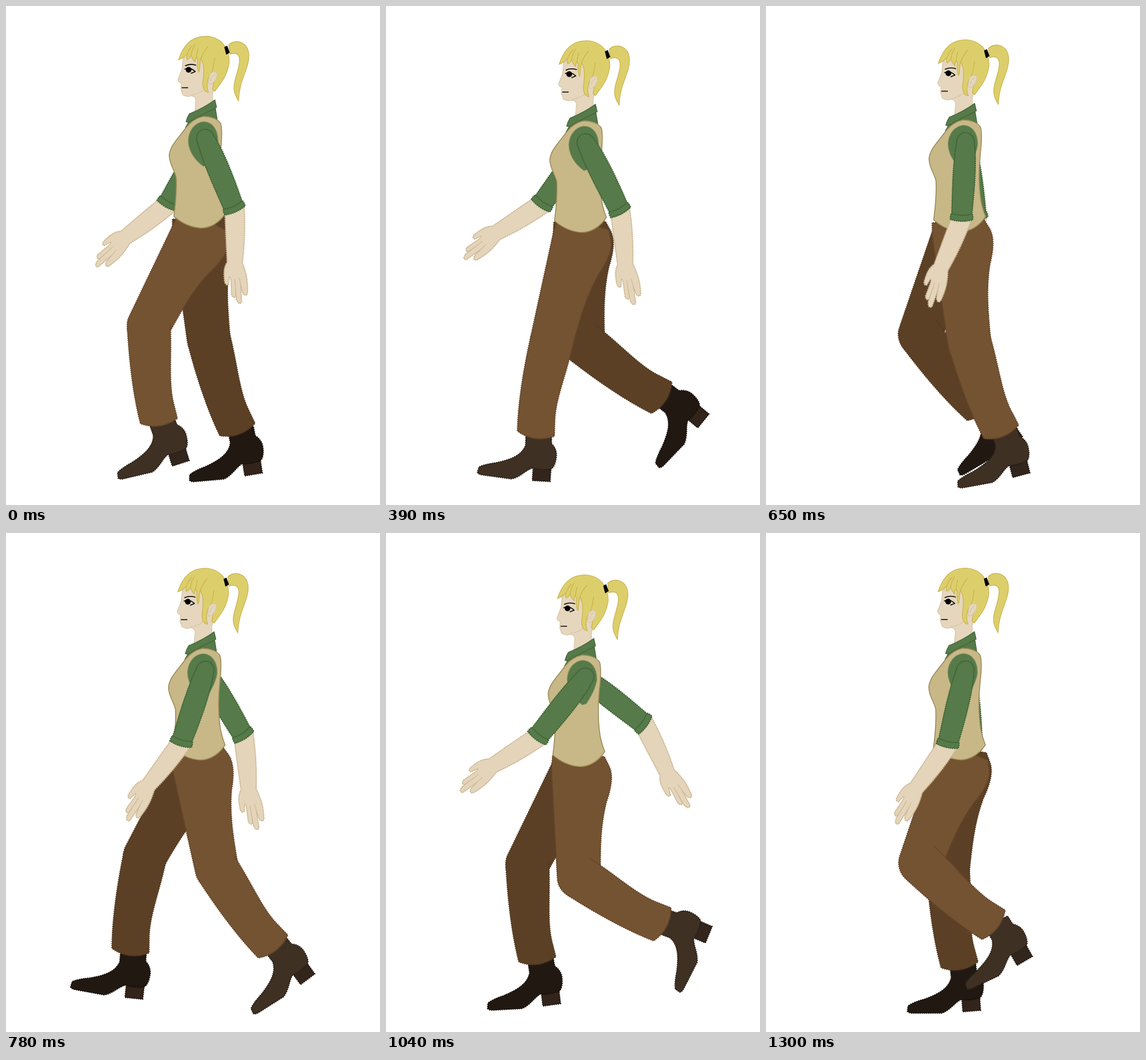
Write an HTML page that moves like this. It is 648 px wide and 864 px high and loops after 1.43 s.

```html
<!DOCTYPE html>
<html lang="en">
<head>
<meta charset="utf-8">
<title>Walk cycle</title>
<style>
  html, body { margin: 0; width: 100%; height: 100%; overflow: hidden; background: #fff; }
  svg { display: block; width: 100vw; height: 100vh; }
  path { stroke-linejoin: round; stroke-linecap: round; stroke-width: 1.2; }
  .line { fill: none; }
  .skin { fill: #e4d4ba; stroke: #cdb996; }
  .face { fill: #e5d6bd; stroke: #d5c6a8; }
  .hair { fill: #dccf6b; stroke: #cbb14c; }
  .sleeve { fill: #567a49; stroke: #3f6436; }
  .vest { fill: #c8b888; stroke: #9c8c58; stroke-width: 1.6; }
  .armhole { stroke: #7d8a58; }
  .ink { fill: #000; stroke: #000; }
  .pen { fill: none; stroke: #000; stroke-width: 1.6; }
  .near .cloth { fill: #745332; stroke: #65462a; }
  .near .boot { fill: #3e3023; stroke: #2c2118; }
  .near .heel { fill: #32251c; stroke: #241a13; }
  .far .cloth { fill: #5b4026; stroke: #523a21; }
  .far .boot { fill: #221812; stroke: #17100c; }
  .far .heel { fill: #33241b; stroke: #20160f; }
  g .fray.fray { fill: none; stroke-width: 3; stroke-dasharray: 1.5 2.2; stroke-linecap: butt; }
</style>
</head>
<body>
<svg viewBox="0 0 648 864" preserveAspectRatio="none">
  <g id="farArm" class="far"></g>
  <g id="farLeg" class="far"></g>
  <g id="nearLeg" class="near"></g>
  <g id="body">
    <!-- neck and face -->
    <path class="face" d="M306 94L304 113L297 131Q298 136 303 137L302 147L305 157Q312 162 320 159Q327 160 328 166L326 192L345 190L357 172V156L372 105L340 75Z"/>
    <path class="face line" d="M320 158Q338 155 349 142"/>
    <!-- ponytail and hair -->
    <path class="hair" d="M385 71C395 60 418 64 420 88C421 112 403 130 402 168C395 156 391 148 397 128C404 105 406 94 401 88C396 84 390 86 387 87Z"/>
    <path class="hair" d="M298 97C304 78 316 56 345 56C372 57 386 76 386 100C383 125 370 138 361 151L357 148Q358 136 364 122Q355 114 350 128C346 140 347 146 350 153Q340 152 340 136Q343 118 341 104L337 94C334 102 336 112 333 118Q330 108 331 97L329 92Q326 97 327 101Q321 95 320 89Q317 95 313 96Q311 91 313 87Q306 94 298 97Z"/>
    <path class="hair line" d="M313 87Q316 78 322 72M320 89Q321 79 327 70M329 92Q330 84 332 77M337 94Q341 83 349 74M351 125C360 115 358 103 361 94"/>
    <path class="face" d="M352 122Q359 114 365 120Q364 134 354 139Q350 139 350 133Z"/>
    <path class="face line" d="M354 133Q354 125 361 122"/>
    <path class="ink" d="M378 75L382 73L386 84L381 87Z"/>
    <!-- features -->
    <path class="pen" d="M310 107Q318 103 328 106M309 113Q317 108 327 117L320 120M304 145H314"/>
    <circle cx="315.5" cy="114" r="5"/>
    <!-- shirt and vest -->
    <path class="sleeve" d="M310 214L317 202L350 186L362 181L365 200L340 204Z"/>
    <path class="sleeve" d="M311 204Q313 196 317 190Q342 180 361 166L364 179Q338 192 315 205Z"/>
    <path class="vest" d="M340 195C352 194 366 199 371 207C374 216 373 230 372 243C368 275 368 310 372 335Q375 350 380 362C368 380 352 388 337 388C319 387 303 379 290 368C293 345 295 318 294 300C290 285 282 277 282 262C283 245 300 230 311 214C320 203 330 197 340 195Z"/>
    <path class="sleeve armhole" d="M341 204C358 204 367 220 366 239C363 256 354 270 348 279L341 281C322 267 315 250 315 236C316 219 326 206 341 204Z"/>
  </g>
  <g id="nearArm" class="near"></g>
</svg>
<script>
const STEP = 130, STEPS = 11;
const HIP = [334, 395], SHOULDER = [345, 234];
const THIGH = 184, SHIN = 173, UPPER_ARM = 130;

// A smooth loop through a few [step, value] keys, given in order of step.
function curve(...keys) {
  return step => {
    let k = keys.findLastIndex(([at]) => at <= step);
    if (k < 0) { k = keys.length - 1; step += STEPS; }
    const [t0, v0] = keys[k];
    const [t1, v1] = keys[(k + 1) % keys.length];
    const span = (t1 - t0 + STEPS) % STEPS;
    return v0 + (v1 - v0) * (1 - Math.cos(Math.PI * (step - t0) / span)) / 2;
  };
}

// Angles in degrees; positive swings forward.
const motion = {
  sway: curve([2.5, 2], [7.5, -1]),
  bob: curve([1, -7], [3, 4], [4, 0], [6, 5], [7, -7], [8, 16.5]),
  nearLeg: {
    thigh: curve([0.7, 30], [6.2, -10]),
    shin: curve([1.1, 21], [9.2, -65]),
    foot: curve([0, -12], [1, 36], [4, 0], [8, -62])
  },
  farLeg: {
    thigh: curve([1.3, -11], [6.9, 33]),
    shin: curve([1, -28], [4, -64], [7, 33], [8, -6], [10, -7]),
    foot: curve([4, -50], [7, 32], [8, -2], [10, 1])
  },
  nearArm: {
    upper: curve([1, -39], [8.7, 40]),
    fore: curve([1, -17], [8.8, 60])
  },
  farArm: {
    upper: curve([1.3, 52], [8, -52]),
    fore: curve([1.3, 73], [8, -25])
  }
};

const $ = id => document.getElementById(id);
const part = (name, d) =>
  `<path class="${name} fray" d="${d}"/><path class="${name}" d="${d}"/>`;

const thigh = part('cloth', 'M-44 -26L-46 0L-37 184A37 37 0 0 0 37 184C37 130 38 95 48 55C57 30 61 8 53 -8L45 -24Z');
const shin = part('cloth', 'M37 0C35 50 23 100 28 137L32 165Q0 183 -32 167C-39 120 -40 60 -37 0');
const shoe =
  part('heel', 'M5 56L7 78L37 75L35 52Z') +
  part('boot', 'M-17 -4L-14 20C-18 38 -34 48 -60 58Q-80 64 -88 70L-89 79Q-88 82 -80 82L-30 81C-15 76 -8 62 3 57Q20 59 36 53Q42 47 41 30Q40 18 29 10L27 -6Z');
const forearm =
  part('skin', 'M-16 -4C-15 40 -13 65 -12 93C-18 103 -18 112 -16 128Q-13 134 -10 131L-8 118Q-5 120 -5 128L-4 150Q0 157 3 151L2 132L4 156Q8 168 13 162L11 130L15 146Q21 154 23 146C24 120 19 108 14 94C18 60 19 30 17 -4Z') +
  '<path class="skin line" d="M2 132L1 122M11 130L9 120"/>';
const upperArm =
  part('sleeve', 'M-15 0A15 16 0 0 1 15 -2C21 30 20 75 17 127H-17C-18 85 -20 40 -15 0Z') +
  part('sleeve', 'M-18 124Q0 129 18 123Q20 128 19 133Q0 139 -19 134Q-20 129 -18 124Z');

for (const side of ['near', 'far']) {
  $(side + 'Leg').innerHTML = `<g>${shoe}</g><g>${thigh}</g><g>${shin}</g>`;
  $(side + 'Arm').innerHTML = `<g>${forearm}</g><g>${upperArm}</g>`;
}

function place(el, [x, y], angle) {
  el.setAttribute('transform', `translate(${x} ${y}) rotate(${angle})`);
}

function along([x, y], angle, length) {
  const a = angle * Math.PI / 180;
  return [x - Math.sin(a) * length, y + Math.cos(a) * length];
}

function poseLeg(id, hip, step) {
  const [foot, top, low] = $(id).children;
  const { thigh, shin, foot: tilt } = motion[id];
  const knee = along(hip, thigh(step), THIGH);
  place(top, hip, thigh(step));
  place(low, knee, shin(step));
  place(foot, along(knee, shin(step), SHIN - 4), tilt(step));
}

function poseArm(id, shoulder, step) {
  const [low, top] = $(id).children;
  const { upper, fore } = motion[id];
  place(top, shoulder, upper(step));
  place(low, along(shoulder, upper(step), UPPER_ARM), fore(step));
}

function pose(step) {
  const dx = motion.sway(step), dy = motion.bob(step);
  const at = ([x, y]) => [x + dx, y + dy];
  place($('body'), [dx, dy], 0);
  for (const side of ['near', 'far']) {
    poseLeg(side + 'Leg', at(HIP), step);
    poseArm(side + 'Arm', at(SHOULDER), step);
  }
}

const start = performance.now();
let shown = -1;
function tick() {
  const step = Math.floor((performance.now() - start) / STEP) % STEPS;
  if (step !== shown) pose(shown = step);
  requestAnimationFrame(tick);
}
tick();
</script>
</body>
</html>
```
